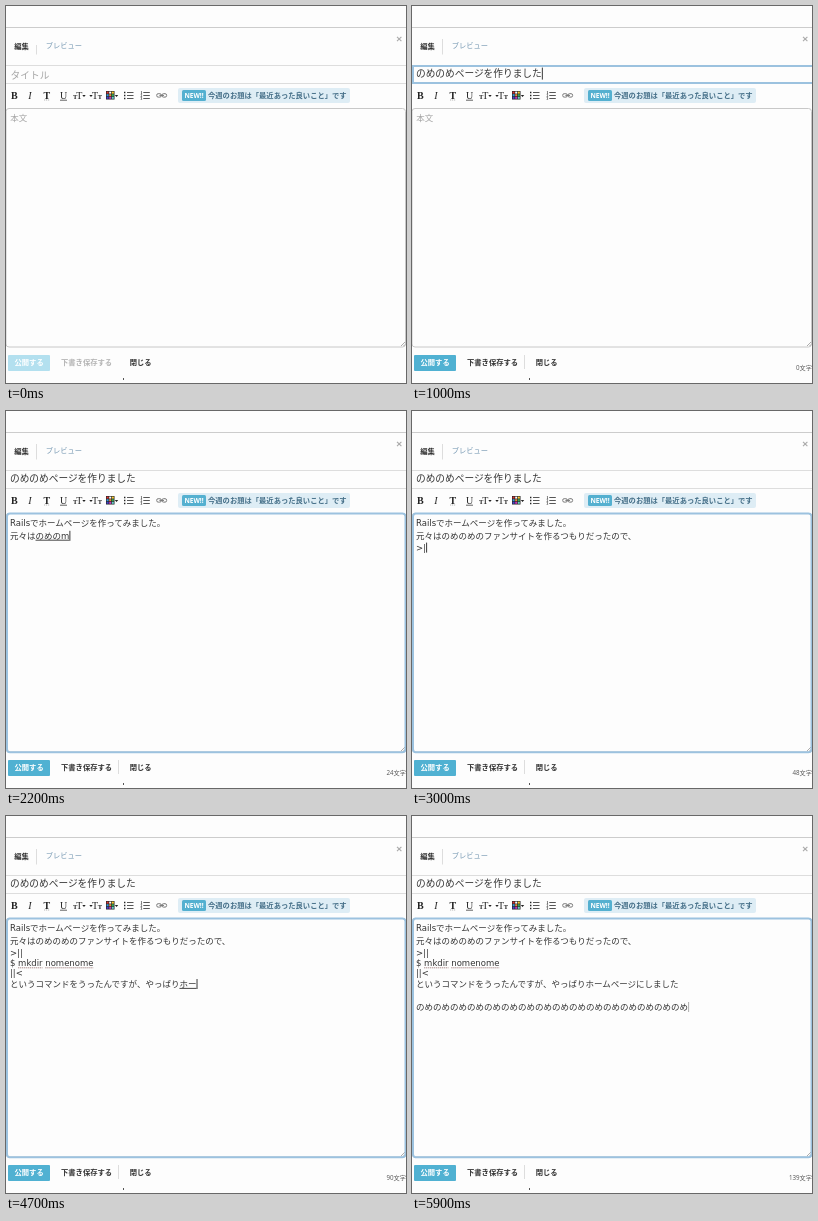
An HTML page that plays this animation: 400x377 px, repeating every 6000 ms.

```html
<!DOCTYPE html>
<html lang="ja">
<head>
<meta charset="utf-8">
<title>Editor</title>
<style>
html, body { margin: 0; width: 100%; height: 100%; overflow: hidden; background: #fdfdfd; }
svg { display: block; width: 100vw; height: 100vh; }
text { font-family: "DejaVu Sans", "Noto Sans CJK JP", "Noto Sans CJK", sans-serif; white-space: pre; fill: #333; }
.ui text { font-family: "Open Sans", "Noto Sans CJK JP", "Noto Sans CJK", sans-serif; font-size: 7.3px; }
.ui .b { font-weight: 700; }
.tools text { font-family: "Liberation Serif", serif; font-weight: 700; font-size: 10px; fill: #222; }
.tools .r { font-weight: 400; }
.tools .s { font-size: 6.5px; }
.tools .n { font-size: 3.6px; }
.ring { fill: none; stroke: #9cc2df; stroke-width: 2; }
.hint { fill: #a5a5a5; }
</style>
</head>
<body>
<svg viewBox="0 0 400 377" preserveAspectRatio="none">
  <rect width="400" height="377" fill="#fdfdfd"/>
  <path d="M0 21.5H400" stroke="#ccc"/>
  <path d="M0 59.5H400M0 77.5H400" stroke="#ddd"/>
  <rect x="0" y="102.5" width="399.5" height="238.5" rx="3" fill="#fdfdfd" stroke="#c8c8c8"/>
  <path d="M395 340l4-4M397.5 340l1.5-1.5" stroke="#888" stroke-width=".7"/>
  <path d="M117.5 372v2" stroke="#555"/>
  <path d="M391 30.8l4.4 4.4m0-4.4l-4.4 4.4" stroke="#aaa" stroke-width="1.1"/>

  <g class="ui">
    <text class="b" x="8.3" y="43">編集</text>
    <text x="39.7" y="42" style="fill:#7799b3">プレビュー</text>
    <path id="tabLine" stroke="#ddd"/>
    <rect x="172" y="82" width="172" height="15" rx="2" fill="#deedf5"/>
    <rect x="176" y="84" width="24" height="11" rx="1.5" fill="#54b0d0"/>
    <text class="b" x="188" y="92" text-anchor="middle" style="fill:#fff;font-size:6.6px">NEW!!</text>
    <text class="b" x="202" y="92" style="fill:#456f88">今週のお題は「最近あった良いこと」です</text>
    <rect id="publish" x="2" y="349" width="42" height="16" rx="1"/>
    <text class="b" x="8.5" y="359.3" style="fill:#fff">公開する</text>
    <text class="b" id="draft" x="55" y="359.3">下書き保存する</text>
    <path id="btnLine" d="M112.5 349v14" stroke="#ddd"/>
    <text class="b" x="123.7" y="359.3">閉じる</text>
    <text id="count" x="400" y="363.8" text-anchor="end" style="font-size:6.2px;fill:#555"></text>
  </g>

  <g class="tools">
    <text x="5" y="93">B</text>
    <text class="r" x="22.3" y="93" font-style="italic">I</text>
    <text x="37.5" y="92.6">T</text>
    <path d="M38 94h6" stroke="#888" stroke-width=".6" stroke-dasharray="1.2 .8"/>
    <text class="r" x="54" y="92.6">U</text>
    <path d="M54 94.2h7" stroke="#222" stroke-width=".7"/>
    <text class="s" x="67" y="93">T</text><text class="r" x="70.3" y="93">T</text>
    <text class="r" x="86" y="93">T</text><text class="s" x="91.7" y="93">T</text>
    <path d="M76.3 89h3.4l-1.7 2zM83.3 89h3.4l-1.7 2zM108.8 89h3.4l-1.7 2z" fill="#222"/>
    <rect x="100" y="85" width="8.5" height="8.5" fill="#222"/>
    <g id="swatches"></g>
    <path d="M121 86.5h6.5M121 89.5h6.5M121 92.5h6.5M137.3 86.5h6.5M137.3 89.5h6.5M137.3 92.5h6.5" stroke="#444" stroke-width=".9"/>
    <path d="M118 86.5h1.4M118 89.5h1.4M118 92.5h1.4" stroke="#222" stroke-width="1.4"/>
    <text class="n" x="134.4" y="87.7">1</text>
    <text class="n" x="134.4" y="90.7">2</text>
    <text class="n" x="134.4" y="93.7">3</text>
    <g fill="none" stroke="#777" stroke-width="1">
      <rect x="150.7" y="87.7" width="4.6" height="3.4" rx="1.5"/>
      <rect x="156" y="87.7" width="4.6" height="3.4" rx="1.5"/>
      <path d="M153.4 89.4h4.6"/>
    </g>
  </g>

  <rect id="titleRing" class="ring" x="1" y="60" width="404" height="17"/>
  <rect id="bodyRing" class="ring" x="1" y="102.5" width="398.5" height="238.7" rx="3"/>
  <text id="titleHint" class="hint" x="4.6" y="72.5" font-size="9.7">タイトル</text>
  <text id="bodyHint" class="hint" x="4.2" y="115" font-size="8.5">本文</text>
  <g id="lines"></g>
  <path id="spell" fill="none" stroke="#95706f" stroke-width=".9" stroke-dasharray="1.2 .8"/>
  <path id="compose" fill="none" stroke="#333" stroke-width=".9"/>
  <path id="caret" fill="none" stroke="#222" stroke-width=".9"/>
</svg>
<script>
const $ = id => document.getElementById(id);
const NS = 'http://www.w3.org/2000/svg';
const LOOP = 6000, STEP = 100, LEFT = 4;
const NAME = 'のめのめ';

function add(parent, tag, attrs) {
  const el = document.createElementNS(NS, tag);
  for (const k in attrs) el.setAttribute(k, attrs[k]);
  return parent.appendChild(el);
}

['#d33', '#fff', '#fc3', '#39d', '#e83', '#3a5', '#44c', '#c3b', '#6cc'].forEach((fill, i) =>
  add($('swatches'), 'rect', {
    x: 100.6 + i % 3 * 2.6, y: 85.6 + Math.floor(i / 3) * 2.6, width: 2, height: 2, fill
  }));

// Baselines: the title first, then the lines of the body.
const lines = [71.2, 115, 127.8, 139.6, 150.2, 160.3, 171, 183, 194].map((y, i) =>
  add($('lines'), 'text', { x: LEFT, y, 'font-size': i ? 8.5 : 9.7 }));

// [text, start, end, direct]: kana is underlined until its end.
// Tab and newline move the caret on.
const strokes = [
  [NAME, 100, 400], ['ページを', 400, 650], ['作りました', 650, 900], ['\t', 1050, 1100],
  ['Rails', 1150, 1400, 1], ['で', 1400, 1460], ['ホームページを', 1460, 1700],
  ['作ってみました。', 1700, 1900], ['\n', 1900, 1950],
  ['元々', 1950, 2050], ['は', 2050, 2100], [NAME, 2100, 2213], ['の', 2213, 2300],
  ['ファンサイトを', 2300, 2500], ['作るつもり', 2500, 2700], ['だったので、', 2700, 2850], ['\n', 2850, 2900],
  ['>||', 2910, 3040, 1], ['\n', 3100, 3150],
  ['$ mkdir nomenome', 3160, 3480, 1], ['\n', 3500, 3550],
  ['||<', 3560, 3700, 1], ['\n', 3700, 3750],
  ['という', 3760, 3900], ['コマンドを', 3900, 4090],
  ['うったんですが、', 4250, 4480], ['やっぱり', 4480, 4640],
  ['ホームページに', 4640, 4840], ['しました', 4840, 4970], ['\n', 4970, 4990],
  ['\n', 5110, 5150], [NAME.repeat(8), 5150, 5790]
];
const roman = { の: 'n', め: 'm', ま: 'm', し: 's', た: 't', で: 'd' };

function layout(t) {
  const rows = lines.map(() => '');
  let row = 0, fixed = 0, total = 0, inBody = false;
  for (const [text, start, end, direct] of strokes) {
    if (inBody && end < t - STEP) total += text.length;
    if (t < start) break;
    if (text === '\t' || text === '\n') {
      if (t >= end) { row++; fixed = 0; inBody = true; }
      continue;
    }
    if (t >= end) {
      rows[row] += text;
      fixed = rows[row].length;
      continue;
    }
    const pos = (t - start) / (end - start) * text.length, n = Math.floor(pos);
    rows[row] += text.slice(0, n);
    if (direct) fixed = rows[row].length;
    else if (pos - n >= .5) rows[row] += roman[text[n]] || '';
  }
  return { rows, row, fixed, total };
}

const show = (id, on) => $(id).style.display = on ? '' : 'none';
const span = (el, n) => LEFT + (n ? el.getSubStringLength(0, n) : 0);

function draw(t) {
  const { rows, row, fixed, total } = layout(t);
  const active = t >= STEP, el = lines[row], len = rows[row].length;
  rows.forEach((s, i) => { if (lines[i].textContent !== s) lines[i].textContent = s; });

  show('titleHint', !rows[0]);
  show('bodyHint', !rows[1]);
  show('titleRing', active && row === 0);
  show('bodyRing', row > 0);
  show('btnLine', active);
  $('tabLine').setAttribute('d', active ? 'M30.5 33v15.5' : 'M30.5 39v9.5');
  $('publish').setAttribute('fill', active ? '#50b1d2' : '#b3e0ef');
  $('draft').style.fill = active ? '#333' : '#b4b4b4';
  $('count').textContent = active ? total + '文字' : '';

  const y = +el.getAttribute('y'), x = span(el, len);
  $('compose').setAttribute('d', len > fixed ? `M${span(el, fixed)} ${y + 1.4}H${x}` : '');
  $('caret').setAttribute('d', `M${x + .6} ${y - (row ? 8 : 9.6)}v${row ? 10 : 12}`);
  const blink = (t >= 4100 && t < 4250) || (t >= 5000 && t < 5150);
  $('caret').style.opacity = !active || blink ? 0 : t >= 5900 ? .4 : 1;

  const cmd = lines[4], mark = (a, b) =>
    rows[4].length >= b ? `M${span(cmd, a)} 151.8H${span(cmd, b)}` : '';
  $('spell').setAttribute('d', mark(2, 7) + mark(8, 16));
}

const origin = performance.now();
function tick() {
  const t = (performance.now() - origin) % LOOP;
  draw(Math.floor(t / STEP) * STEP);
  requestAnimationFrame(tick);
}
tick();
</script>
</body>
</html>
```
